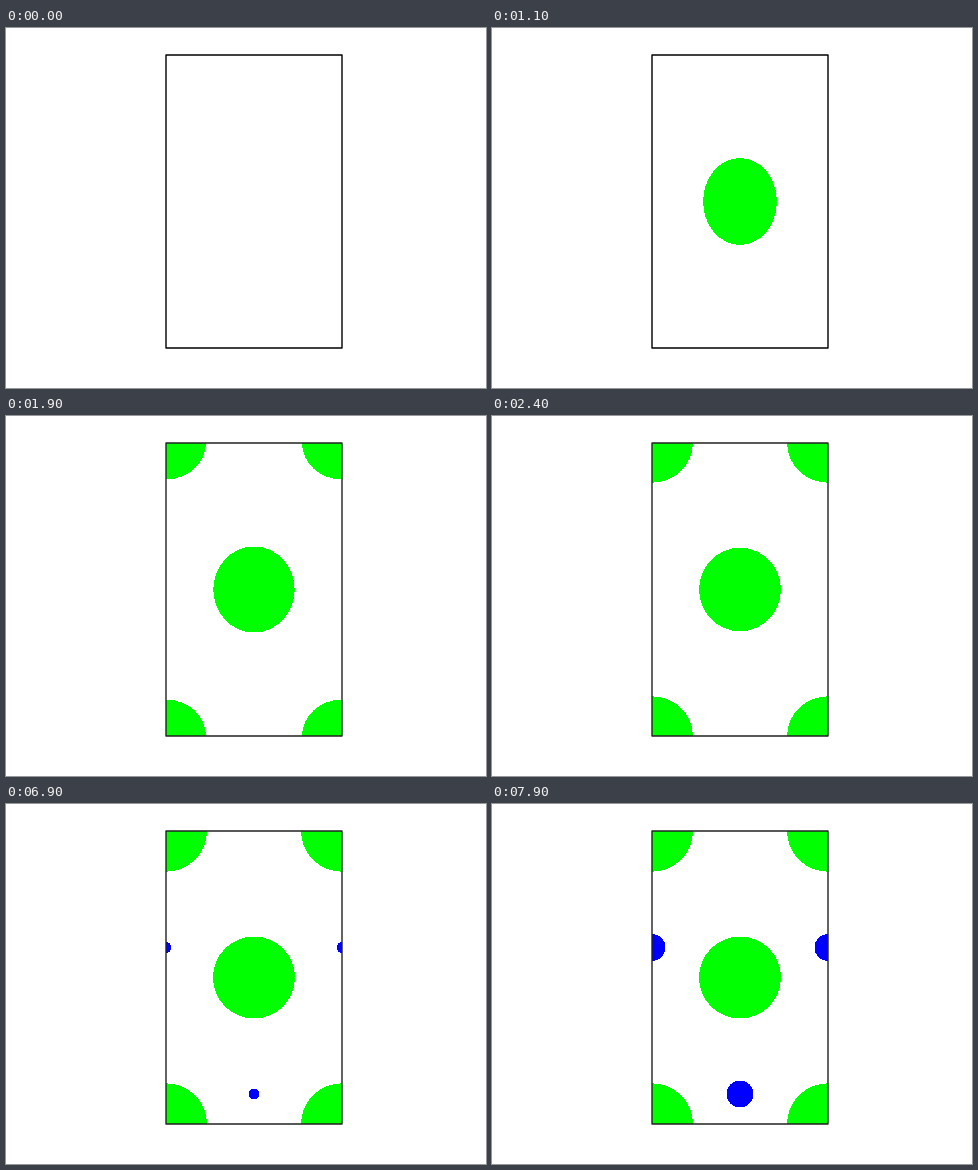
These frames come from a looping animation (480 px wide and 360 px high, 8000 ms). An HTML page:

```html
<!DOCTYPE html>
<html lang="en">
<head>
<meta charset="utf-8">
<title>Growing dots in a cell</title>
<style>
  html, body { margin: 0; width: 100%; height: 100%; overflow: hidden; background: #fff; }
  svg { display: block; width: 480px; height: 360px; }
  ellipse { shape-rendering: crispEdges; }
</style>
</head>
<body>
<svg viewBox="0 0 480 360">
  <clipPath id="cell"><rect x="160" y="27" width="176" height="293"/></clipPath>
  <g id="dots" clip-path="url(#cell)"></g>
  <rect id="edge" x="160" y="27" width="176" height="293" fill="none"
        stroke="#000" stroke-width="1.4" stroke-linejoin="round"/>
</svg>
<script>
const LOOP = 8000, STEP = 100;
const L = 160, R = 336, T = 27, B = 320, CX = 248, CY = 173.5;
const dots = document.getElementById('dots');
const edge = document.getElementById('edge');

// Radius after n steps, closing in on `full` by a fixed ratio
const grow = (full, keep, n) => full * (1 - keep ** n);

function makeDots(color, points) {
  return points.map(([cx, cy]) => {
    const el = document.createElementNS('http://www.w3.org/2000/svg', 'ellipse');
    el.setAttribute('cx', cx);
    el.setAttribute('cy', cy);
    el.setAttribute('fill', color);
    return dots.appendChild(el);
  });
}

function size(els, rx, ry) {
  for (const el of els) {
    el.setAttribute('rx', rx);
    el.setAttribute('ry', ry);
  }
}

const middle = makeDots('#0f0', [[CX, CY]]);
const corners = makeDots('#0f0', [[L, T], [R, T], [L, B], [R, B]]);
const small = makeDots('#00f', [[L, 143.5], [R, 143.5], [CX, 290]]);

function draw(time) {
  const step = Math.floor(time / STEP);
  const since = first => Math.max(0, step - first + 1);

  // The middle dot overshoots in height before it settles round
  const a = since(5);
  const bulge = 1.25 * a * a * Math.exp(-0.32 * a);
  size(middle, grow(41, 0.72, a), grow(41, 0.72, a) + bulge);

  const b = since(12);
  size(corners, grow(41, 0.63, b), grow(40.7, 0.754, b));
  edge.setAttribute('stroke', b ? '#222' : '#000');

  const r = grow(13.5, 0.6, since(69));
  size(small, r, r);
}

const start = performance.now();
function tick() {
  draw((performance.now() - start) % LOOP);
  requestAnimationFrame(tick);
}
tick();
</script>
</body>
</html>
```
